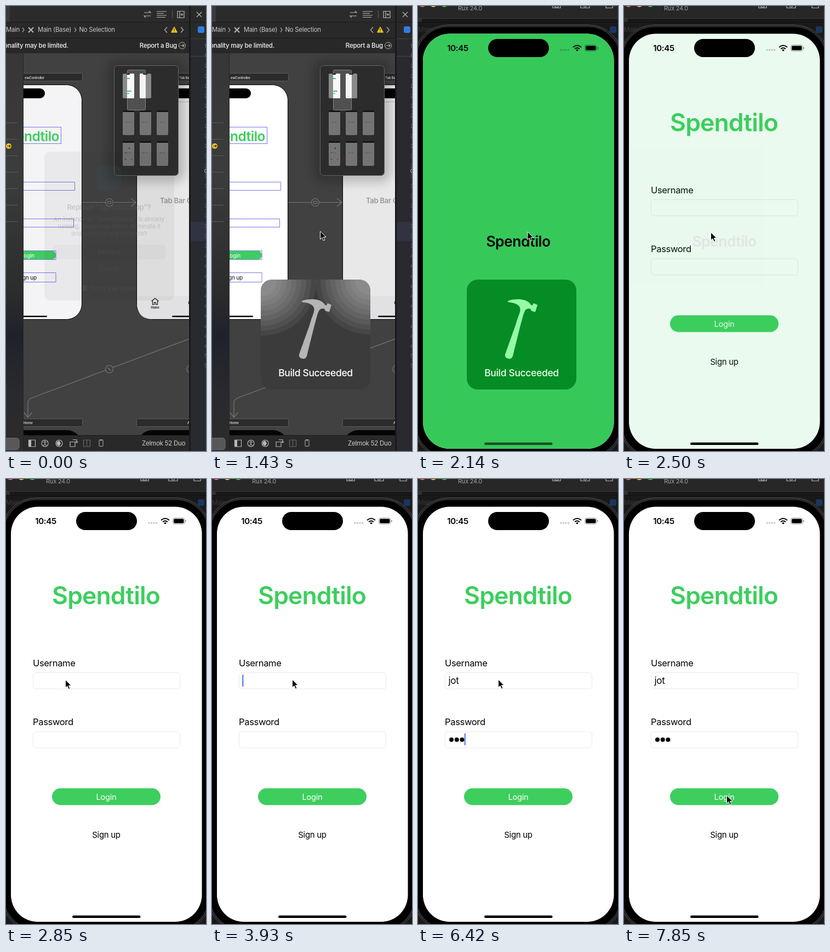
Write an HTML page that moves like this. It is 365 px wide and 810 px high and loops after 8 s.

```html
<!DOCTYPE html>
<html lang="en">
<head>
<meta charset="utf-8">
<title>Build and sign in</title>
<style>
  html, body { margin: 0; width: 100%; height: 100%; overflow: hidden; background: #262626; }
  svg { display: block; width: 365px; height: 810px; }
  text { font-family: Inter, "Open Sans", sans-serif; letter-spacing: -.02em; white-space: pre; }
  .mid { text-anchor: middle; }
  .end { text-anchor: end; }
  .semi { font-weight: 600; }
  .line { fill: none; stroke: #b8b8b8; stroke-width: 1.2; }
  .wire { fill: none; stroke: #777; stroke-width: 1.2; }
  .outline { fill: none; stroke: #7977e8; stroke-width: 1; }
</style>
</head>
<body>
<svg id="stage" viewBox="0 0 365 810" xmlns="http://www.w3.org/2000/svg"></svg>
<script>
const APP = 'Spendtilo';
const GREEN = '#3dce5e';
const stage = document.getElementById('stage');

const rect = (x, y, w, h, fill, r = 0, more = '') =>
  `<rect x="${x}" y="${y}" width="${w}" height="${h}" rx="${r}" fill="${fill}" ${more}/>`;
const circle = (x, y, r, fill, more = '') =>
  `<circle cx="${x}" cy="${y}" r="${r}" fill="${fill}" ${more}/>`;
const text = (x, y, size, fill, label, cls = '', more = '') =>
  `<text x="${x}" y="${y}" font-size="${size}" fill="${fill}" class="${cls}" ${more}>${label}</text>`;
const path = (d, cls = 'line', more = '') => `<path d="${d}" class="${cls}" ${more}/>`;
const repeat = (n, fn) => Array.from({ length: n }, (_, i) => fn(i)).join('');

const defs = `<defs>
  <linearGradient id="side" x2="0" y2="1">
    <stop offset="0" stop-color="#363637"/><stop offset=".3" stop-color="#3b3c3c"/>
    <stop offset=".6" stop-color="#2b2c2c"/><stop offset=".71" stop-color="#1f222b"/>
    <stop offset=".85" stop-color="#292a2e"/><stop offset="1" stop-color="#2c2c2c"/>
  </linearGradient>
  <clipPath id="canvas"><rect x="32" y="86" width="302" height="695"/></clipPath>
  <clipPath id="panelShape"><rect x="89" y="498" width="200" height="200" rx="20"/></clipPath>
  <filter id="soft" x="-30%" y="-30%" width="160%" height="160%"><feGaussianBlur stdDeviation="9"/></filter>
</defs>`;

const hammer = ink => `<path fill="${ink}" d="M164 537C172 533 186 533 193 535C200 537 204 540 206 544
  L209 545L211 541L218 544L214 557L207 555L205 551C201 550 197 551 195 555C192 561 191 567 189 574L187 581
  L173 637Q171 643 166 642L162 641Q158 639 159 634L178 581L181 571C184 562 188 555 186 549C183 542 174 540 164 539Z"/>`;
const buildPanel = (fill, ink, label, glow = '') => rect(89, 498, 200, 200, fill, 20) + glow + hammer(ink) +
  text(189, 674, 17.5, label, 'Build Succeeded', 'mid', 'font-weight="500"');

function toolbars() {
  const triangle = '<path d="M307 38L312.5 48H301.5Z" fill="#f5c518" stroke="#f5c518" stroke-linejoin="round"/>';
  return rect(0, 0, 334, 30, '#2b2b2b') + rect(0, 0, 7, 29, '#3a3a3a') + rect(0, 29, 334, 1, '#1b1b1b') +
    path('M252 12H264L261 9M264 18H252L255 21M275 10H293M275 13.500H288M275 17H293M275 20.500H291') +
    path('M303.500 8V22', 'line', 'opacity=".35"') +
    path('M313 9.500H325V21.500H313ZM317 9.500V21.500M318.500 15.500H323.500M321 13V18') +
    rect(0, 30, 334, 28, '#292929') + rect(0, 58, 334, 1, '#1b1b1b') +
    text(0, 47, 11.3, '#c8c8c8', 'Main') + path('M30 39.500L33 43.500L30 47.500M125 39.500L128 43.500L125 47.500') +
    path('M41 39L50 48M50 39L41 48', 'line', 'style="stroke-width:2"') +
    text(58, 47, 11.3, '#c8c8c8', 'Main (Base)') + text(133.5, 47, 11.3, '#c8c8c8', 'No Selection') +
    path('M294 38.500L289.500 43.500L294 48.500M319 38.500L323.500 43.500L319 48.500') + triangle +
    rect(306.4, 41, 1.2, 4, '#333') + rect(306.4, 46, 1.2, 1.2, '#333') +
    rect(0, 59, 334, 27, '#282828') + text(114, 76, 11.5, '#f4f4f4', 'onality may be limited.', 'end', 'font-weight="500"') +
    text(312, 76, 11.5, '#f4f4f4', 'Report a Bug', 'end', 'font-weight="500"') +
    circle(321.5, 72, 6, 'none', 'stroke="#b8b8b8"') + path('M318 72H325M322.500 69.500L325 72L322.500 74.500');
}

function bottomBar() {
  return rect(32, 781, 302, 29, '#292929') + rect(32, 781, 302, 1, '#1d1d1d') +
    path('M41.500 790H53.500V802H41.500Z') + rect(42, 790, 4, 12, '#b8b8b8') +
    circle(71, 796, 6, 'none', 'stroke="#b8b8b8" stroke-width="1.2"') +
    path('M67.500 794H74.500M71 794V797L68.500 800.500M71 797L73.500 800.500') + circle(71, 792, 1, '#b8b8b8') +
    circle(97, 796, 6, 'none', 'stroke="#b8b8b8" stroke-width="1.2"') +
    '<path d="M97 791.5L93 794V798L97 800.5L99.500 796Z" fill="#b8b8b8" stroke="#b8b8b8"/>' +
    path('M117 793.500H126V802H117ZM122 789.500H129V795M127 793L129 795L131 793') +
    path('M141.500 790H153.500V802H141.500ZM147.500 790V802', 'line', 'opacity=".45"') +
    rect(170, 789.5, 7, 12, 'none', 1.5, 'stroke="#b8b8b8"') + path('M172 791H175') +
    text(248, 800, 11.5, '#d0d0d0', 'Zelmok 52 Duo');
}

function sidebars() {
  const numbers = repeat(33, i => {
    const y = 72 + i * 18.2;
    return text(362, y + 4, 9, '#6c6e75', i < 2 ? 1 : i < 11 ? 2 : i < 21 ? 3 : i < 31 ? 4 : 5);
  });
  return rect(0, 86, 32, 724, 'url(#side)') + rect(31, 86, 1, 724, '#252525') +
    repeat(7, i => rect(0, 212 + i * 30, 21, 1, '#5c5d5e')) +
    circle(5, 255, 5, '#f3c324') + path('M2 255H8M6 253L8 255L6 257', 'line', 'style="stroke:#222"') +
    rect(-10, 786.5, 34, 21, '#58585a', 5, 'stroke="#707072"') +
    rect(334, 0, 3, 810, '#1a1a1b') + rect(337, 0, 28, 810, '#292a30') +
    rect(337, 0, 28, 59, '#292929') + rect(337, 29, 28, 1, '#1b1b1b') + rect(337, 59, 28, 1, '#424248') +
    rect(337, 91, 28, 1, '#48494f') + rect(337, 393, 28, 35, '#313342') + numbers +
    path('M348 11L357 20M357 11L348 20') + rect(350, 37, 12, 12, '#2f7be5', 3) +
    circle(366.5, 300, 4, 'none', 'stroke="#c5c5c8"');
}

function minimap() {
  const row = (y, n) => repeat(n, i => {
    const x = 213 + i * 31;
    return rect(x, y, 21, 45, '#747474', 2) + rect(x, y, 21, 3, '#151515', 1) +
      rect(x + 5, y + 21, 4, 1, '#525252') + rect(x + 11, y + 21, 3, 1, '#525252');
  });
  // Only the part of a scene inside the viewport is at full brightness.
  return rect(185, 97, 142, 224, '#000', 20, 'opacity=".2" filter="url(#soft)"') +
    rect(197.5, 108.5, 117, 200, '#2c2c2c', 6, 'stroke="#646464"') +
    rect(221.5, 116.5, 33, 73, '#505050', 2, 'stroke="#858585"') +
    rect(213, 123, 21, 45, '#8a8a8a', 2) + rect(221, 123, 13, 45, '#f8f8f8', 1) +
    rect(220, 123, 6, 2, '#111', 1) +
    rect(221, 131, 5, 2, GREEN) + rect(218, 154, 11, 2, GREEN, 1) + rect(221, 159, 4, 1, '#777') +
    rect(244, 123, 21, 45, '#8a8a8a', 2) + rect(244, 123, 11, 45, '#f4f4f4', 2) + rect(250, 123, 8, 2, '#222', 1) +
    row(190, 3) + row(246, 3) +
    circle(225, 259, 1.2, '#333') + circle(218, 267, 1.2, '#943a3a') + circle(218, 279, 1, '#333') + circle(229, 279, 1.2, '#943a3a');
}

function storyboard() {
  const sceneTitle = (x, y, w) => rect(x + .5, y + .5, w, 14, '#2b2b2b', 1, 'stroke="#5b5b5b"');
  const small = (x, y, label, cls) => text(x, y, 6, '#d8d8d8', label, cls + ' semi');
  const node = (x, y) => circle(x, y, 7, '#414141', 'stroke="#777" stroke-width="1.2"');
  return `<g clip-path="url(#canvas)">` + rect(32, 86, 302, 695, '#414141') +
    sceneTitle(20, 122, 119) + small(70, 132.5, 'ewController', 'end') +
    sceneTitle(238, 122, 119) + small(316, 132.5, 'Tab Bar C', '') +
    rect(-75, 143.5, 213.5, 427, '#fff', 28, 'id="phone" stroke="#000"') + rect(0, 150, 71, 18, '#000', 9) +
    rect(0, 563.8, 75, 2.4, '#000', 1.2) +
    text(97, 245.5, 24.5, GREEN, APP, 'end semi') + rect(-20, 220.5, 120.5, 30, 'none', 0, 'class="outline"') +
    path('M20 320.500H125.500V335.500H20M20 387.500H123.500V402.500H20M20 485.500H91V502.500H20', 'outline') +
    rect(-20, 445.5, 111, 16, GREEN, 8) + path('M20 445.500H91V461.500H20', 'outline') +
    text(52, 457.5, 10, '#fff', 'Login', 'end') + text(56, 497.5, 10, '#111', 'Sign up', 'end') +
    rect(238.5, 143.5, 214, 427, '#e8e8e9', 28, 'stroke="#000"') + rect(307, 150, 78, 18, '#000', 9) +
    rect(239, 174, 100, 1, '#b8b8b8') + rect(239, 528, 100, 15, '#e1e1e4') +
    '<path d="M239 543H340V570H267Q241 570 239 543" fill="#e1e1e4"/>' +
    rect(303, 563.8, 70, 2.4, '#000', 1.2) +
    text(281, 358.5, 13, '#98989a', 'Tab Bar Controller', 'semi') +
    path('M265.500 537.500L272 532L278.500 537.500M267.500 537V543.500H270.500V539.500H273.500V543.500H276.500V537', 'line', 'style="stroke:#111"') +
    text(272, 551, 5.5, '#111', 'Home', 'mid semi') + circle(337, 540, 4, 'none', 'stroke="#222"') +
    path('M139 357.500H237M228 350L237 357.500L228 365', 'wire') + node(188.5, 357.5) +
    path('M185.500 355.500H191.500V359.500H185.500Z', 'wire') +
    path('M334 606L48 713Q40 716 40 722V748M32.500 740L40 748.500L47.500 740', 'wire') + node(188.5, 661) +
    path('M186 658.500L191 663.500', 'wire') + node(337, 661) +
    sceneTitle(20, 751, 119) + small(32, 761, 'Home', '') + sceneTitle(238, 751, 119) + small(331, 761, 'Account', '') +
    rect(-75, 772, 214, 60, '#050505', 28) + rect(239, 772, 214, 60, '#050505', 28) +
    minimap() + '</g>';
}

function dialog() {
  const ghost = (x, y, size, label, cls = 'mid') => text(x, y, size, '#626262', label, cls, 'opacity=".25"');
  return '<g id="dialog">' + rect(70, 265, 237, 271, '#202020', 10, 'opacity=".05"') +
    rect(165, 291, 45, 45, '#35566c', 10, 'opacity=".15"') +
    ghost(188, 371, 13, `Replace "${APP}App"?`, 'mid semi') +
    ghost(188, 392, 11, `An instance of "${APP}App" is already`) +
    ghost(188, 405, 11, 'running. Would you like to terminate it') + ghost(188, 418, 11, 'and launch a new instance?') +
    rect(86, 434, 205, 27, '#303030', 6, 'opacity=".03"') + ghost(188, 452, 12, 'Replace') +
    ghost(188, 482, 12, 'Cancel') +
    rect(137, 508, 11, 11, '#707070', 3, 'opacity=".18"') + ghost(153, 518, 12, "Don't ask again", '') + '</g>';
}

function simulatorFrame() {
  return rect(0, 0, 365, 810, '#191919') + rect(0, 0, 365, 23, '#272727') + rect(0, 22, 365, 1, '#393939') +
    ['#fe5f57', '#febc2e', '#28c840'].map((c, i) => circle(8 + i * 20, -4, 6, c)).join('') +
    text(73, 8, 11, '#a0a0a0', 'Rux 24.0') +
    path('M246 -5V3.500H260V-5M250 -1H256V2H250ZM297 -5V3.500H313V-5M343 -5V3.500H355V-5') + circle(305, -1, 3, 'none', 'stroke="#b8b8b8"') +
    rect(0, 23, 7, 7, '#303030') + rect(0, 29, 365, 1, '#0f0f0f') + rect(288, 34, 5, 4, '#333') +
    text(0, 47, 11.3, '#383838', 'Main') + rect(350, 37, 12, 12, '#19365e', 3) +
    rect(-7, 34.5, 380, 789, '#000', 62, 'stroke="#606060"') +
    rect(-4.5, 37, 375, 784, '#000', 60, 'stroke="#2b2b2b" stroke-width="3"');
}

const screen = fill => rect(9, 50.5, 348.5, 755.5, fill, 49);

function login() {
  const field = y => rect(49.5, y + .5, 268, 29.5, '#fff', 5, 'stroke="#e9e9e9"');
  return '<g id="login">' + screen('#fff') + text(182.5, 228, 44.5, GREEN, APP, 'mid semi') +
    text(49, 341, 16.5, '#000', 'Username') + field(352) +
    text(49, 448, 16.5, '#000', 'Password') + field(459.5) +
    rect(84, 563, 198, 30.5, GREEN, 15.2) + text(183, 584, 14.7, '#fff', 'Login', 'mid') +
    text(183, 653, 15, '#000', 'Sign up', 'mid') +
    text(55.5, 373, 17, '#000', '', '', 'id="user"') +
    `<g id="dots">${repeat(3, i => circle(61 + i * 9.7, 474.5, 4, '#000'))}</g>` +
    rect(0, 0, 2, 22, '#4070e0', 1, 'id="caret"') + '</g>';
}

function statusBar() {
  return text(72.5, 82, 15, '#000', '10:45', 'mid semi') + rect(128, 60, 111, 33, '#000', 16.5) +
    repeat(4, i => circle(261 + i * 4.5, 80, 1.7, '#000', 'opacity=".22"')) +
    '<g fill="none" stroke="#000" stroke-width="2"><path d="M283 75Q290.500 68.500 298 75"/><path d="M286 78Q290.500 74.500 295 78"/></g>' +
    '<path d="M288 80Q290.500 78 293 80L290.500 82.500Z"/>' +
    rect(304.5, 71, 21.5, 11, 'none', 3.5, 'stroke="#000" stroke-opacity=".4"') + rect(306, 72.5, 18.5, 8, '#000', 2) +
    rect(327, 74.5, 1.6, 4, '#000', .8, 'opacity=".4"') +
    rect(121, 794.5, 124.5, 4.5, '#000', 2.2, 'id="homeBar"');
}

const rings = (x, y) => repeat(9, i => circle(x, y, 98 - i * 9, '#fff', 'opacity=".055"'));
const panelGlow = `<g clip-path="url(#panelShape)">${rings(92, 502)}${rings(287, 500)}</g>`;

stage.innerHTML = defs +
  '<g id="editor">' + rect(0, 0, 365, 810, '#292929') + storyboard() + toolbars() + bottomBar() + sidebars() +
  dialog() + `<g id="darkPanel">${buildPanel('#3b3b3b', '#b5b5b5', '#fff', panelGlow)}</g></g>` +
  '<g id="simulator">' + simulatorFrame() + login() +
  `<g id="splash">${screen('#36c95a')}${text(183, 438, 26.5, '#000', APP, 'mid semi')}</g>` + statusBar() +
  `<g id="greenPanel">${buildPanel('#058c24', '#96fba6', '#e9ffed')}</g></g>` +
  `<path id="pointer" d="M0 0V14.500L3.400 11.400L5.900 17L8.300 16L5.900 10.500H10.500Z" fill="#000" stroke="#fff" stroke-width="1"/>`;

const $ = Object.fromEntries([...stage.querySelectorAll('[id]')].map(node => [node.id, node]));
const show = (node, on) => node.setAttribute('visibility', on ? 'inherit' : 'hidden');

// Each step overrides the state left by the earlier ones.
const steps = [
  { at: 0, scene: 'dialog', pointer: null, user: '', dots: 0, focus: '', blink: 0 },
  { at: 360, scene: 'built', pointer: [190, 247] },
  { at: 720, pointer: [190, 355] },
  { at: 1070, pointer: [178, 447] },
  { at: 1430, pointer: [197.5, 410] },
  { at: 1780, scene: 'splash', pointer: [185.5, 419] },
  { at: 2140, pointer: [200, 411] },
  { at: 2500, scene: 'fade', pointer: [158.5, 412] },
  { at: 2850, scene: 'login', pointer: [108.5, 365.5] },
  { at: 3210, pointer: [108, 366] },
  { at: 3570, pointer: [114, 366], focus: 'user', blink: 1 },
  { at: 3930, pointer: [146.5, 365] },
  { at: 4290, blink: 0 },
  { at: 4640, user: 'j', blink: 1 },
  { at: 5000, user: 'jo' },
  { at: 5350, user: 'jot' },
  { at: 5710, focus: 'pass' },
  { at: 6070, dots: 2 },
  { at: 6420, dots: 3 },
  { at: 6780, pointer: [173.5, 438], blink: 0 },
  { at: 7140, pointer: [187.5, 546], blink: 1 },
  { at: 7490, pointer: [187.5, 576], blink: .5 },
  { at: 7850, blink: 0 }
];

function render(time) {
  const s = Object.assign({}, ...steps.filter(step => step.at <= time));
  const editing = s.scene === 'dialog' || s.scene === 'built';
  show($.editor, editing);
  show($.simulator, !editing);
  show($.dialog, s.scene === 'dialog');
  show($.darkPanel, s.scene === 'built');
  $.phone.setAttribute('fill', s.scene === 'dialog' ? '#f4f4f6' : '#fff');
  show($.greenPanel, s.scene === 'splash');
  $.splash.setAttribute('opacity', { splash: 1, fade: .1 }[s.scene] || 0);
  $.homeBar.setAttribute('opacity', s.scene === 'splash' ? .6 : 1);

  $.user.textContent = s.user;
  [...$.dots.children].forEach((dot, i) => show(dot, i < s.dots));
  const inUser = s.focus === 'user';
  const typed = inUser ? (s.user ? $.user.getComputedTextLength() : 0) : s.dots * 9.8;
  $.caret.setAttribute('x', 55.3 + typed);
  $.caret.setAttribute('y', inUser ? 356 : 463);
  $.caret.setAttribute('opacity', s.blink);

  show($.pointer, s.pointer);
  if (s.pointer) $.pointer.setAttribute('transform', `translate(${s.pointer})`);
}

const start = performance.now();
function tick() {
  render((performance.now() - start) % 8000);
  requestAnimationFrame(tick);
}
tick();
</script>
</body>
</html>
```
